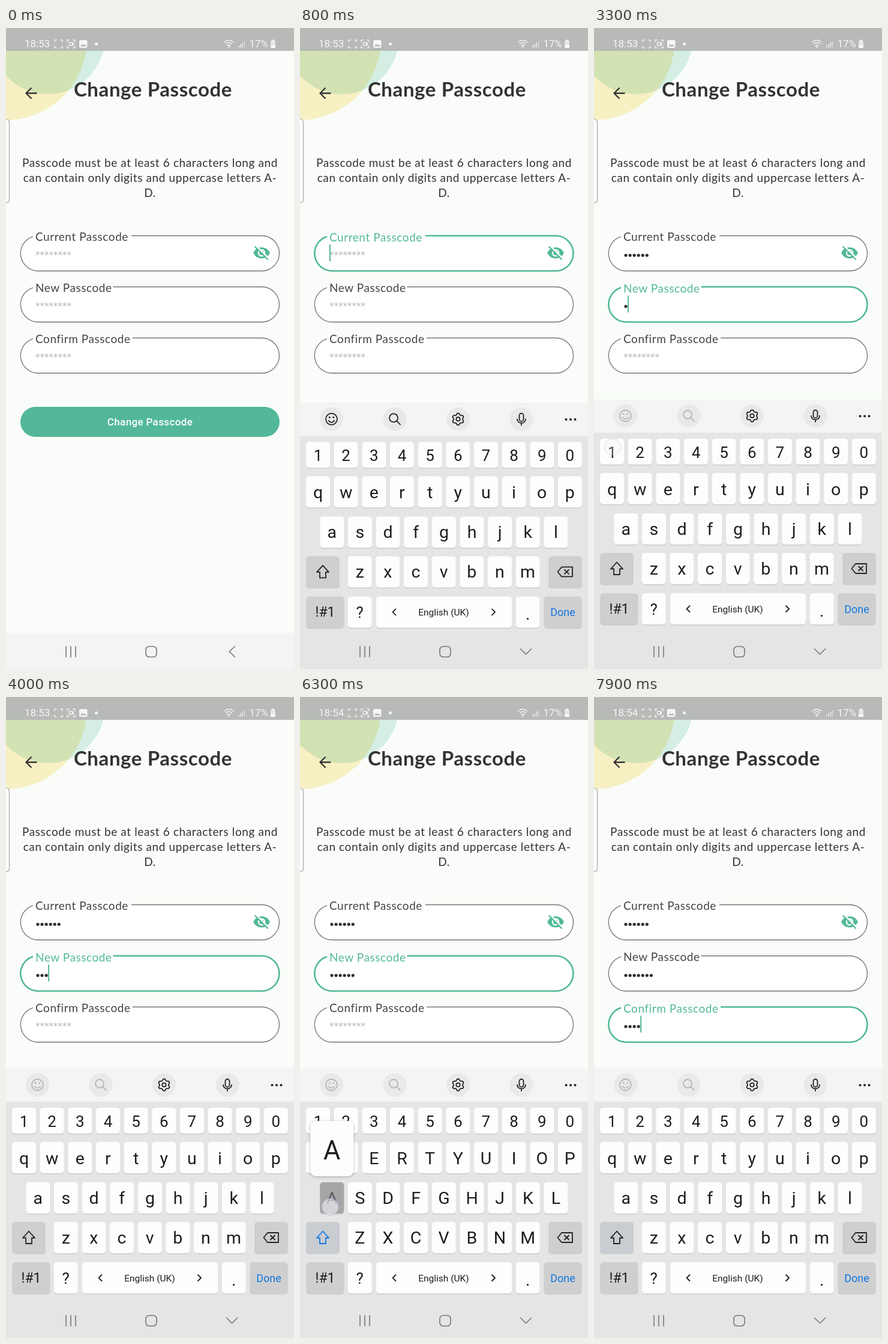
An HTML page that plays this animation: 480x1066 px, repeating every 8000 ms.

```html
<!DOCTYPE html>
<html lang="en">
<head>
<meta charset="utf-8">
<title>Change Passcode</title>
<style>
  html, body { margin: 0; width: 100%; height: 100%; overflow: hidden; background: #f9fcf8; }
  svg { display: block; width: 100vw; height: 100vh; }
  text { font-family: Roboto, sans-serif; fill: #1d1d1d; }
  .lato { font-family: Lato, sans-serif; fill: #333; }
  .hint { font-family: "DejaVu Sans", sans-serif; fill: #b4b4b4; }
  .mid { text-anchor: middle; }
  .line { fill: none; stroke: #222; stroke-width: 1.8; stroke-linecap: round; stroke-linejoin: round; }
  .stat text { fill: #f6f6f6; font-size: 17px; }
  .stat .line { stroke: #f4f4f4; stroke-width: 1.4; }
  .nav .line { stroke: #777; stroke-width: 1.6; }
  .blend { mix-blend-mode: multiply; }
  #popBox { filter: drop-shadow(0 1px 2px rgba(0, 0, 0, .28)); }
</style>
</head>
<body>
<svg id="stage" viewBox="0 0 480 1066" preserveAspectRatio="none"></svg>
<script>
const LOOP = 8000, STEP = 100;
const GREEN = '#52b899';
const stage = document.getElementById('stage');
const $ = id => document.getElementById(id);
const show = (id, on) => $(id).setAttribute('visibility', on ? 'visible' : 'hidden');
const set = (id, attrs) => { for (const k in attrs) $(id).setAttribute(k, attrs[k]); };

const text = (x, y, size, str, extra = '') =>
  `<text x="${x}" y="${y}" font-size="${size}" ${extra}>${str}</text>`;
const mid = (x, y, size, str, extra = '') => text(x, y, size, str, `class="mid" ${extra}`);
const line = (d, extra = '') => `<path class="line" d="${d}" ${extra}/>`;
const rect = (x, y, w, h, r, fill, extra = '') =>
  `<rect x="${x}" y="${y}" width="${w}" height="${h}" rx="${r}" fill="${fill}" ${extra}/>`;
const dot = (x, y, r, fill, extra = '') =>
  `<circle cx="${x}" cy="${y}" r="${r}" fill="${fill}" ${extra}/>`;

// Status bar
const corners = x => line(`M${x} 23V20H${x + 3}M${x + 10} 20H${x + 13}V23M${x + 13} 30V33H${x + 10}M${x + 3} 33H${x}V30`);
const camera = x => line(`M${x + 3.5} 24h5v5h-5zM${x + 8.5} 26l2-1.5v4l-2-1.5`);
const statusBar = () => `<g class="stat">${rect(0, 0, 480, 38, 0, '#b7bab7')}
  ${text(31, 32, 17, '18:53', 'id="clock"')}
  ${corners(81)}<g id="rec">${camera(81)}</g>${corners(102)}${camera(102)}
  ${rect(122, 20, 13.5, 13, 2.5, '#f6f6f6')}<path d="M124 30.5l3-4 2.5 2.5 1.5-2 3 3.500z" fill="#b0b3b0"/>
  ${dot(150.5, 26.5, 2.5, '#f6f6f6')}
  ${line('M364 23.5Q371.5 17 379 23.5M366.5 26.5Q371.5 22 376.5 26.5M369 29.5Q371.5 27.5 374 29.5')}
  ${dot(371.5, 31.5, 1.3, '#f6f6f6')}${line('M378 29v3', 'id="data"')}
  ${[0, 1, 2, 3].map(i => line(`M${388 + i * 3.2} 32v${-2 - i * 2.6}`, i > 2 ? 'opacity=".6"' : '')).join('')}
  ${text(405.5, 32, 17, '17%')}
  ${rect(441, 21, 8, 12, 1.5, '#f6f6f6', 'opacity=".75"')}${rect(443, 19.5, 4, 2, 0, '#f6f6f6')}
  ${rect(441, 29, 8, 4, 1, '#fff')}
</g>`;

// Form
const FIELDS = [
  { label: 'Current Passcode', y: 345, gap: 209 },
  { label: 'New Passcode', y: 430, gap: 178.5 },
  { label: 'Confirm Passcode', y: 515, gap: 211 }
];
const DOT_STEP = 7.05;
const field = ({ label, y, gap }, i) => {
  const h = 58.5, r = h / 2, top = y + .5;
  return rect(24.5, top, 431, h, r, '#fff') +
    `<path id="box${i}" d="M${gap} ${top}H${455.5 - r}a${r} ${r} 0 0 1 0 ${h}H${24.5 + r}A${r} ${r} 0 0 1 45 ${top + 1.3}" fill="none"/>` +
    text(49, y + 8.5, 19, label, `id="label${i}" class="lato" letter-spacing=".55"`) +
    text(49, y + 38, 15, '********', `id="hint${i}" class="hint"`) +
    `<g id="dots${i}">` + [...Array(7).keys()].map(n => dot(53 + n * DOT_STEP, y + 33, 2.6, '#2d2d2d')).join('') + '</g>';
};
const eye = `<path d="M412.2 374c2.2-5.4 7.5-9.300 13.8-9.300s11.600 3.900 13.800 9.300c-2.200 5.400-7.500 9.300-13.800 9.300s-11.600-3.900-13.800-9.300z" fill="${GREEN}"/>
  <circle cx="426" cy="374" r="5" fill="${GREEN}" stroke="#fff" stroke-width="2.4"/>
  <path d="M416.3 361.700l22 22" stroke="#fff" stroke-width="2.5"/>
  <path d="M414.6 363.300l22 22" stroke="${GREEN}" stroke-width="2.2"/>`;
const page = () => rect(0, 0, 480, 1066, 0, '#f9fcf8') +
  dot(70, 15, 95, '#d4eee4') + dot(0, 18, 135, '#fdf3c8', 'class="blend"') +
  rect(-12, 151.5, 17.5, 139, 5, '#fcfdfc', 'stroke="#a5a5a5" stroke-width="1.2"') +
  line('M51.5 108.5H34M42.5 99.5L33.5 108.5L42.5 117.5', 'style="stroke:#333;stroke-width:2.3;stroke-linecap:butt;stroke-linejoin:miter"') +
  text(245, 114, 33, 'Change Passcode', 'class="lato mid" font-weight="700" letter-spacing=".6"') +
  ['Passcode must be at least 6 characters long and',
   'can contain only digits and uppercase letters A-', 'D.']
    .map((s, i) => text(240, 230.5 + i * 25, 19, s, 'class="lato mid" letter-spacing=".62"')).join('') +
  FIELDS.map(field).join('') + eye +
  `<rect id="caret" width="2" height="28" fill="${GREEN}"/>` +
  rect(24, 630, 432, 50, 25, GREEN) +
  mid(240, 661, 17, 'Change Passcode', 'font-weight="500" letter-spacing=".35" style="fill:#fff"');

// Keyboard
const PITCH = 46.65;
const keys = {};
const addRow = (chars, x, y, h, size, base) => [...chars].forEach((c, i) => {
  keys[c] = { x: x + i * PITCH, y, w: 40, h, size, base, fill: '#fdfdfd' };
});
addRow('1234567890', 30, 683, 43, 26, 715);
addRow('qwertyuiop', 30, 740, 52, 28.5, 777);
addRow('asdfghjkl', 53.3, 807, 52, 28.5, 843);
addRow('zxcvbnm', 99.7, 873, 52, 28.5, 909);
const addKey = (name, x, y, w, fill, size, base) => { keys[name] = { x, y, w, h: 52, fill, size, base }; };
addKey('shift', 38, 873, 56, '#cfcfcf');
addKey('del', 442, 873, 56, '#cfcfcf');
addKey('!#1', 42, 940, 63, '#cfcfcf', 23, 974);
addKey('?', 99.7, 940, 40, '#fdfdfd', 26, 975.5);
addKey('space', 240, 940, 226, '#fdfdfd');
addKey('.', 379.7, 940, 40, '#fdfdfd', 28, 979);
addKey('Done', 438, 940, 63, '#cfcfcf', 18, 972.5);

const keySvg = name => {
  const { x, y, w, h, size, base, fill } = keys[name];
  return rect(x - w / 2, y + 1.5, w, h, 5, '#cbcbcb') +
    rect(x - w / 2, y, w, h, 5, fill, `id="key-${name}"`) +
    (size ? mid(x, base, size, name, `id="cap-${name}" ${name === 'Done' ? 'style="fill:#1277e0"' : ''}`) : '');
};
const gear = () => {
  const pts = [...Array(48).keys()].map(i => {
    const a = i / 48 * 2 * Math.PI, r = 8.7 + 1.2 * Math.tanh(2 * Math.cos(6 * a + Math.PI));
    return `${(263.5 + r * Math.cos(a)).toFixed(1)} ${(645 + r * Math.sin(a)).toFixed(1)}`;
  });
  return line(`M${pts.join('L')}Z`) + '<circle class="line" cx="263.5" cy="645" r="3.2"/>';
};
const toolbar = () => rect(0, 618, 480, 55, 0, '#f3f4f3') +
  [52.5, 158, 263.5, 369].map(x => dot(x, 645, 19.5, '#e8e9e8')).join('') +
  `<g id="tools"><circle class="line" cx="52.5" cy="645" r="9.5"/>
    ${line('M47.5 647.5Q52.5 653.5 57.5 647.5')}${dot(49.3, 642, 1.5, '#222')}${dot(55.7, 642, 1.5, '#222')}
    <circle class="line" cx="156" cy="643" r="7"/>${line('M161.5 648.5L167 654')}</g>` +
  gear() +
  '<rect class="line" x="365.5" y="635.5" width="7" height="13" rx="3.5"/>' +
  line('M362 645a7 6.5 0 0 0 14 0M369 651.5V655') +
  [443.5, 451, 458.5].map(x => dot(x, 645.5, 2, '#222')).join('');
const keyboard = () => `<g id="board">${rect(0, 618, 480, 460, 0, '#e5e5e5')}${toolbar()}
  ${Object.keys(keys).map(keySvg).join('')}
  ${line('M38 888.5L48 899.5H43V909H33V899.5H28Z', 'id="arrow"')}
  ${line('M436 891H454V907H436L429.5 899ZM441 895.5l7 7M448 895.5l-7 7')}
  ${line('M159.5 961l-5 5 5 5M320 961l5 5-5 5')}
  ${mid(239.5, 971.5, 15.5, 'English (UK)')}</g>`;

const navBar = () => `<g class="nav">${rect(0, 1006, 480, 60, 0, '#f4f4f4', 'id="navBg"')}
  ${line('M100 1028.5V1046M108 1028.5V1046M116 1028.5V1046')}
  <rect class="line" x="233" y="1028.5" width="18" height="17.5" rx="5.5"/>
  ${line('M381.5 1028.5L372 1037L381.5 1046', 'id="back"')}</g>`;

const overlay = () => `<g id="pop">${rect(0, 0, 72, 92, 9, '#fdfdfd', 'id="popBox"')}
    ${mid(36, 63.5, 43.5, '', 'id="popText"')}</g>
  <g id="touch"><circle r="13.5" fill="#f3f4fa" fill-opacity=".6" stroke="#b9bbd8" stroke-opacity=".7" stroke-width="1.5"/></g>`;

stage.innerHTML = page() + keyboard() + navBar() + statusBar() + overlay();

// Touches: [target, down, up, dx, dy]; a number target focuses that field
const TOUCHES = [
  [0, 320, 440],
  ['1', 1000, 1100], ['2', 1220, 1310], ['3', 1440, 1540], ['4', 1680, 1780],
  ['5', 1880, 1980, -5.5, 8], ['6', 2150, 2260],
  [1, 2500, 2620],
  ['1', 3130, 3240, 1, -8], ['2', 3480, 3590], ['3', 3780, 3890], ['4', 4060, 4170],
  ['5', 4350, 4460], ['6', 4660, 4780],
  ['shift', 5700, 5820], ['a', 6220, 6390, -3, 15],
  [2, 6640, 6760],
  ['1', 7020, 7110], ['2', 7240, 7340], ['3', 7480, 7570], ['4', 7700, 7790]
];
const FADE = 105;

function stateAt(t) {
  const s = { focus: -1, typed: [0, 0, 0], last: 0, caps: false, shifted: false, touch: null };
  for (const [target, down, up, dx = -3, dy = 6] of TOUCHES) {
    if (t < down) break;
    if (t < up + FADE) s.touch = { target, dx, dy, held: t < up, alpha: t < up ? 1 : 1 - (t - up) / FADE };
    if (t < up) break;
    if (typeof target === 'number') { s.focus = target; s.last = up; }
    else if (target === 'shift') s.caps = s.shifted = true;
    else { s.typed[s.focus]++; s.last = up; s.caps = false; }
  }
  return s;
}

function drawTouch(touch, caps) {
  show('touch', touch);
  const key = touch && keys[touch.target];
  const held = key && touch.held;
  const popup = held && touch.target.length === 1;
  show('pop', popup);
  for (const name in keys) {
    const on = held && name === touch.target;
    if (name !== 'shift') set('key-' + name, { fill: on ? '#a6a6a6' : keys[name].fill });
    if (keys[name].size) $('cap-' + name).style.opacity = on ? .55 : 1;
  }
  if (!touch) return;
  const x = key ? key.x + touch.dx : 240;
  const y = key ? key.y + key.h / 2 + touch.dy : FIELDS[touch.target].y + 30;
  set('touch', { transform: `translate(${x} ${y})`, opacity: touch.alpha });
  if (popup) {
    set('pop', { transform: `translate(${Math.max(9, key.x - 36)} ${key.y - 102})` });
    $('popText').textContent = caps ? touch.target.toUpperCase() : touch.target;
  }
}

function draw(t) {
  const s = stateAt(t);
  FIELDS.forEach(({ y }, i) => {
    const on = s.focus === i, n = s.typed[i];
    set('box' + i, { stroke: on ? GREEN : '#737573', 'stroke-width': on ? 2.6 : 1.3 });
    set('label' + i, { y: y + (on ? 9.5 : 8.5) });
    $('label' + i).style.fill = on ? GREEN : '#444';
    show('hint' + i, !n);
    [...$('dots' + i).children].forEach((c, k) => c.setAttribute('visibility', k < n ? 'visible' : 'hidden'));
  });
  show('caret', s.focus >= 0 && (t - s.last) % 1000 < 500);
  if (s.focus >= 0) set('caret', { x: 49 + DOT_STEP * s.typed[s.focus], y: FIELDS[s.focus].y + 15 });

  const p = Math.min(1, Math.max(0, (t - 465) / 435));
  set('board', { transform: `translate(0 ${448 * (1 - p) ** 3})` });
  show('board', p > 0);
  set('navBg', { fill: p > 0 ? '#e5e5e5' : '#f4f4f4' });
  set('back', { d: p > 0 ? 'M367.5 1032.5L376.5 1041.5L385.5 1032.5' : 'M381.5 1028.5L372 1037L381.5 1046' });
  set('tools', { opacity: s.focus > 0 ? .25 : 1 });

  for (const c of 'qwertyuiopasdfghjklzxcvbnm') $('cap-' + c).textContent = s.caps ? c.toUpperCase() : c;
  $('arrow').style.stroke = s.caps ? '#1277e0' : '#222';
  set('key-shift', { fill: s.shifted ? '#c9ccd1' : '#cfcfcf' });
  drawTouch(s.touch, s.caps);

  const blink = t % 1600 >= 200 && t % 1600 < 800;
  show('rec', blink);
  show('data', blink);
  $('clock').textContent = t < 4800 ? '18:53' : '18:54';
}

const start = performance.now();
function tick() {
  const t = (performance.now() - start) % LOOP;
  draw(Math.floor(t / STEP) * STEP);
  requestAnimationFrame(tick);
}
draw(0);
requestAnimationFrame(tick);
</script>
</body>
</html>
```
